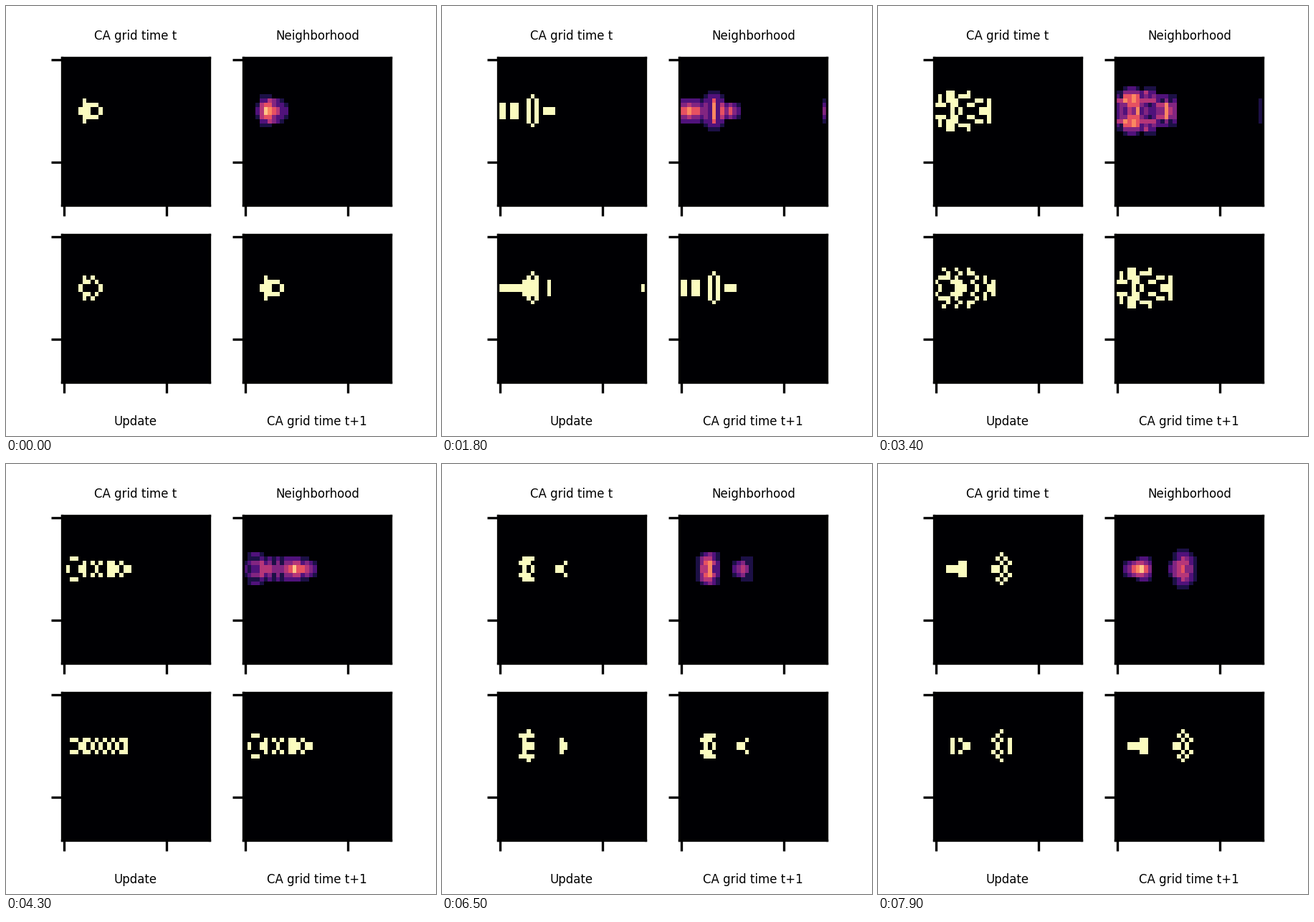
Write a matplotlib script that moves like this. It is 600 px wide and 600 px high and loops after 8 s.

```python
import numpy as np
import matplotlib.pyplot as plt
from matplotlib.animation import FuncAnimation

SIZE = 36
STEPS = 80

# Upper half of the start pattern, row -> live columns; mirrored below row 12.
SEED = {10: [5], 11: [5, 6, 7, 8], 12: [4, 5, 6, 9]}
BIRTH = [3, 6, 8]
SURVIVE = [2, 4, 5]


def count_neighbors(grid):
    return sum(
        np.roll(grid, (dy, dx), axis=(0, 1))
        for dy in (-1, 0, 1)
        for dx in (-1, 0, 1)
        if dy or dx
    )


def step(grid):
    n = count_neighbors(grid)
    alive = np.where(grid == 1, np.isin(n, SURVIVE), np.isin(n, BIRTH))
    return alive.astype(int)


def start_grid():
    grid = np.zeros((SIZE, SIZE), dtype=int)
    for row, cols in SEED.items():
        grid[row, cols] = 1
        grid[25 - row, cols] = 1
    return grid


history = [start_grid()]
for _ in range(STEPS):
    history.append(step(history[-1]))

fig, axes = plt.subplots(2, 2, figsize=(2, 2), dpi=300)
fig.subplots_adjust(left=0.125, right=0.9, bottom=0.125, top=0.88,
                    wspace=0.2, hspace=0.2)


def make_panel(ax, vmax):
    ax.set_xticks([0, 25], labels=["", ""])
    ax.set_yticks([0, 25], labels=["", ""])
    return ax.imshow(history[0], cmap="magma", vmin=0, vmax=vmax,
                     interpolation="nearest")


panels = [make_panel(ax, vmax) for ax, vmax in zip(axes.flat, (1, 8, 1, 1))]
axes[0, 0].set_title("CA grid time t", fontsize=4)
axes[0, 1].set_title("Neighborhood", fontsize=4)
axes[1, 0].set_xlabel("Update", fontsize=4)
axes[1, 1].set_xlabel("CA grid time t+1", fontsize=4)


def draw(i):
    grid = history[i]
    views = (grid, count_neighbors(grid), history[i + 1], grid)
    for panel, view in zip(panels, views):
        panel.set_data(view)
    return panels


anim = FuncAnimation(fig, draw, frames=STEPS, interval=100,
                     repeat=True, repeat_delay=0)
plt.show()
```
